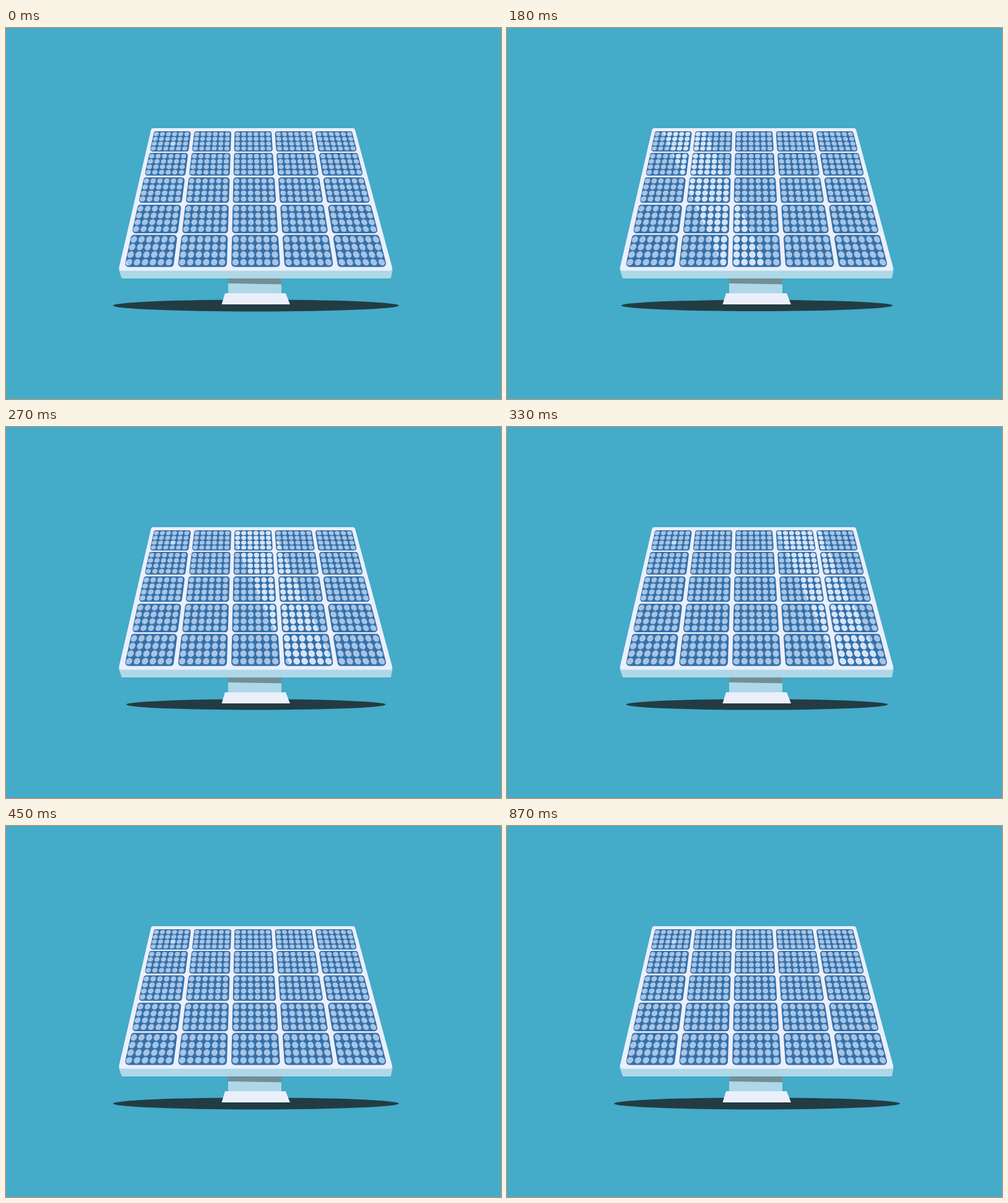
An HTML page with a canvas that plays this animation: 800x600 px, repeating every 1830 ms.

```html
<!DOCTYPE html>
<html lang="en">
<head>
<meta charset="utf-8">
<title>Solar panel</title>
<style>
html, body { margin: 0; width: 100%; height: 100%; overflow: hidden; background: #44abc8; }
canvas { display: block; }
</style>
</head>
<body>
<canvas width="800" height="600"></canvas>
<script>
const ctx = document.querySelector('canvas').getContext('2d');
const LOOP = 1830, STEP = 30, GRID = 5;
const WHITE = '#ebeffc', ICE = '#aed8e7';

const mix = (a, b, k) => a + (b - a) * k;

// Point on the tilted panel: u runs across the cells, y is the screen height
function panelX(u, y) {
  const k = (y - 167) / 220;
  return mix(mix(239.5, 191.2, k), mix(559, 616, k), u);
}

// Rounded trapezoid between two heights, given by its left and right edges
function trapezoid(top, bottom, [l0, r0], [l1, r1], radius = 0) {
  const corners = [[l0, top], [r0, top], [r1, bottom], [l1, bottom]];
  const path = new Path2D();
  path.moveTo((l0 + r0) / 2, top);
  for (let i = 1; i <= 4; i++) path.arcTo(...corners[i % 4], ...corners[(i + 1) % 4], radius);
  path.closePath();
  return path;
}

function ellipse(rx, ry, x = 0, y = 0) {
  const path = new Path2D();
  path.ellipse(x, y, rx, ry, 0, 0, 2 * Math.PI);
  return path;
}

function fill(path, color) {
  ctx.fillStyle = color;
  ctx.fill(path);
}

const cells = new Path2D(), dots = new Path2D(), brightDot = new Path2D();

function addDots(row, col, u0, u1, top, height) {
  for (let j = 0; j < 4; j++) {
    const y = top + height * (0.14 + 0.236 * j);
    const width = panelX(u1, y) - panelX(u0, y);
    for (let i = 0; i < 6; i++) {
      const u = mix(u0, u1, 0.075 + 0.005 * col + 0.164 * i);
      const x = panelX(u, y), shear = panelX(u, y + 1) - x;
      const place = new DOMMatrix([1, 0, shear, 1, x, y]);
      const dot = ellipse(width * 0.066, height * 0.102);
      dots.addPath(dot, place);
      if (row + col === 0 && j === 2 && i === 3) brightDot.addPath(dot, place);
    }
  }
}

for (let row = 0; row < GRID; row++) {
  // Rows grow towards the viewer
  const top = 167 + 35 * row + 2.3 * row * (row - 1);
  const height = 32.7 * 1.123 ** row;
  const bottom = top + height;
  for (let col = 0; col < GRID; col++) {
    const u0 = col * 0.2034, u1 = u0 + 0.1864;
    const edges = y => [panelX(u0, y), panelX(u1, y)];
    cells.addPath(trapezoid(top, bottom, edges(top), edges(bottom), height / 9));
    addDots(row, col, u0, u1, top, height);
  }
}

const neck = trapezoid(404, 431, [359, 445], [359, 445]);
const neckShade = new Path2D('M359 404H445V414.5L359 413Z');
const base = trapezoid(429, 447, [354, 452], [348.5, 459]);
const front = trapezoid(390, 405, [182, 625], [187, 622], 1);
const panel = trapezoid(162, 392.5, [235, 563.5], [181.5, 625.5], 4);

function drawShadow(t) {
  const k = Math.min(1, Math.max(0, (t - 120) / 330));
  const scale = 1 - 0.094 * Math.sin(Math.PI * k);
  fill(ellipse(231 * scale, 9.6 * scale, 404, 448.8), '#233c44');
}

function drawShine(t) {
  const edges = y => {
    const x = 35 + 1.23 * t + 0.45 * (y - 180);
    return [x, x + 71];
  };
  ctx.save();
  ctx.clip(dots);
  fill(trapezoid(160, 395, edges(160), edges(395)), '#d5e4f7');
  ctx.restore();
}

function draw(now) {
  const t = Math.floor(now % LOOP / STEP) * STEP;
  ctx.fillStyle = '#44abc8';
  ctx.fillRect(0, 0, 800, 600);
  drawShadow(t);
  fill(neck, ICE);
  fill(neckShade, '#718f98');
  fill(base, WHITE);
  fill(front, ICE);
  fill(panel, WHITE);
  fill(cells, '#3470aa');
  fill(dots, '#a7c4e4');
  if (t < 450) drawShine(t);
  fill(brightDot, '#c4dcf2');
  requestAnimationFrame(draw);
}
requestAnimationFrame(draw);
</script>
</body>
</html>
```
